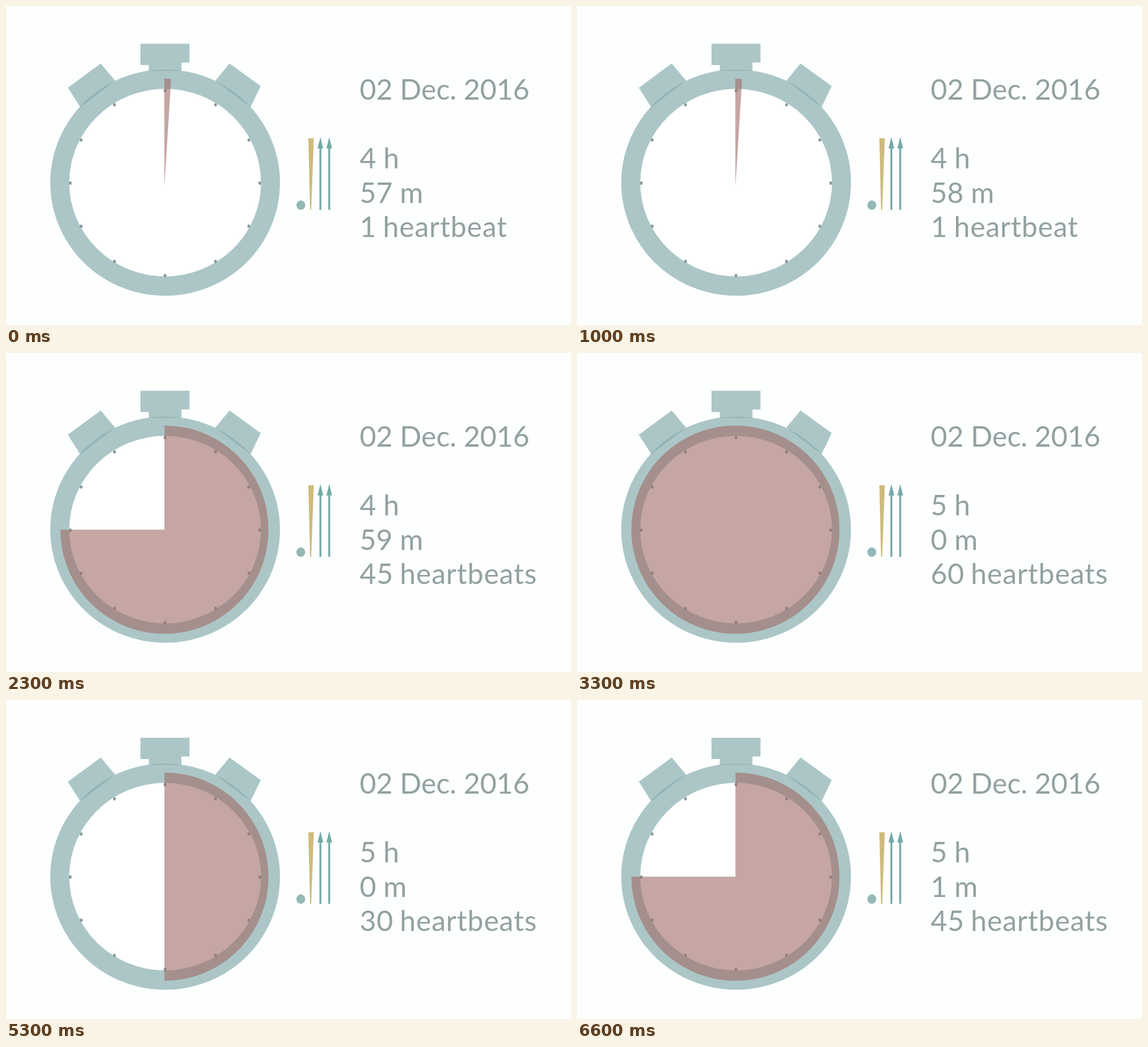
Write an HTML page that moves like this. It is 996 by 562 pixels and loops after 6700 ms.

```html
<!DOCTYPE html>
<html lang="en">
<head>
<meta charset="utf-8">
<title>Stopwatch</title>
<style>
  html, body { margin: 0; width: 100%; height: 100%; overflow: hidden; background: #fdfefe; }
  svg { display: block; width: 996px; height: 562px; }
  text { font: 400 50px Lato, "Open Sans", sans-serif; fill: #92a1a1; }
  #beats { letter-spacing: .8px; word-spacing: -2.4px; }
  .case { fill: rgba(134, 173, 175, .68); }
</style>
</head>
<body>
<svg viewBox="0 0 996 562">
  <ellipse cx="280.5" cy="311.2" rx="169.5" ry="165.7" fill="#fff"/>
  <path class="case" d="M237 66.6H323.5V99.5H309.3V114.2H251.7V104H237Z"/>
  <path class="case" d="M109 144L167 101.3L192.3 131.5L131 178.5Z"/>
  <path class="case" d="M394 101.3L449 141L431 178.5L369 131.5Z"/>
  <path class="case" fill-rule="evenodd" d="M78 311.2a202.5 199.3 0 1 1 405 0a202.5 199.3 0 1 1 -405 0Z
    M111.5 311.2a169 165.2 0 1 0 338 0a169 165.2 0 1 0 -338 0Z"/>
  <g id="dots" fill="#8a9b9d"></g>
  <path id="pie" fill="rgba(158,108,102,.6)"/>

  <ellipse cx="519.7" cy="350.8" rx="7.8" ry="8.3" fill="#92b8b7"/>
  <path fill="#cdbb7b" d="M533 233H542.6L538 359H536Z"/>
  <path id="arrow" fill="#74aaa8" d="M554.2 231L559.2 251H555.9V359H552.5V251H549.2Z"/>
  <use href="#arrow" x="15.6"/>

  <text x="623.5" y="165">02 Dec. 2016</text>
  <text id="hours" x="623.5" y="286"></text>
  <text id="minutes" x="623.5" y="347"></text>
  <text id="beats" x="623.5" y="407"></text>
</svg>
<script>
const LOOP = 6700;
const FIRST_MINUTE = 4 * 60 + 57;
const CX = 279.3, CY = 311.3, R = 183.5;
const $ = id => document.getElementById(id);

// [duration, repeats]: the clock slows down around the full hour
const PACE = [[200, 5], [100, 6], [200, 1], [500, 1], [1000, 2], [500, 3], [200, 3], [100, 3]];
const holds = PACE.flatMap(([ms, n]) => Array(n).fill(ms));

function stepAt(t) {
  let step = 0;
  while (t >= holds[step]) t -= holds[step++];
  return step;
}

function addDots() {
  let dots = '';
  for (let i = 0; i < 12; i++) {
    const a = i * Math.PI / 6;
    const b = a + .045 * Math.sin(2 * a);
    const x = 280.3 + 167 * Math.sin(b), y = 312 - 163 * Math.cos(b);
    dots += `<ellipse cx="${x}" cy="${y}" rx="2.5" ry="2.9"/>`;
  }
  $('dots').innerHTML = dots;
}

function piePath(beats) {
  if (beats === 1) return 'M279 128L291 128.6L279.3 319Z';
  // just short of a full turn, so that the arc stays drawable
  const a = Math.min(beats / 60, .99999) * 2 * Math.PI;
  const x = CX + R * Math.sin(a), y = CY - R * Math.cos(a);
  return `M${CX} ${CY}V${CY - R}A${R} ${R} 0 ${+(beats > 30)} 1 ${x} ${y}Z`;
}

function draw(step) {
  const beats = step % 5 * 15 || 1;
  // the minute rolls over on the sixtieth beat
  const total = FIRST_MINUTE + Math.floor((step + 1) / 5);
  $('pie').setAttribute('d', piePath(beats));
  $('hours').textContent = `${Math.floor(total / 60)} h`;
  $('minutes').textContent = `${total % 60} m`;
  $('beats').textContent = `${beats} heartbeat${beats > 1 ? 's' : ''}`;
}

const begin = performance.now();
let shown = -1;
function tick() {
  const step = stepAt((performance.now() - begin) % LOOP);
  if (step !== shown) draw(shown = step);
  requestAnimationFrame(tick);
}
addDots();
tick();
</script>
</body>
</html>
```
